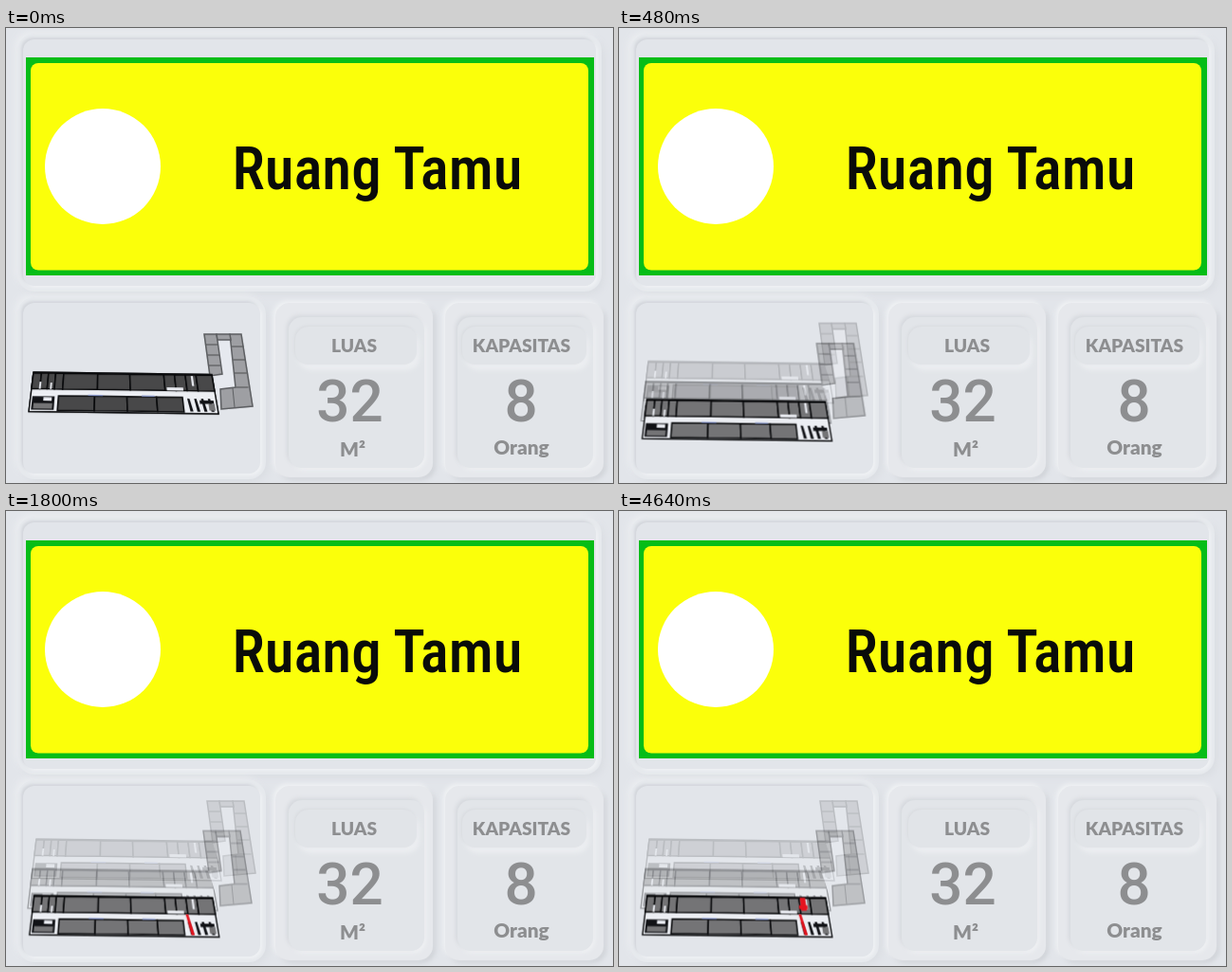
An HTML page that plays this animation: 640x480 px, repeating every 5.12 s.

```html
<!DOCTYPE html>
<html lang="id">
<head>
<meta charset="utf-8">
<title>Ruang Tamu</title>
<style>
html, body { margin: 0; width: 100%; height: 100%; overflow: hidden; background: #e2e5ea; }
.stage { position: relative; width: 640px; height: 480px; overflow: hidden; background: #e2e5ea; }
.stage div { position: absolute; box-sizing: border-box; }
.well {
  border-radius: 12px; background: #e2e5ea;
  box-shadow: -2px -2px 3px #d3d6dc, 2px 2px 3px #eff1f4, 0 0 0 6px #e6e9ed, 4px 4px 9px 4px #d9dce1, -4px -4px 9px 4px #eceef1;
}
.ring { border-radius: 15px; background: #e6e8ec; box-shadow: -2px -2px 5px #f1f3f5, 3px 3px 5px #d0d3d8; }
.dip { border-radius: 14px; background: #e2e5e9; box-shadow: -2px -2px 4px #d5d8dd, 2px 2px 4px #f0f2f4; }
.chip { border-radius: 14px; background: #e1e4e8; box-shadow: -1px -1px 3px #d8dbdf, 3px 6px 5px #eceef1; }
svg { position: absolute; left: 0; top: 0; }
text { text-anchor: middle; fill: #8d8e90; }
.title { font: 500 63px "Roboto Condensed", Roboto, sans-serif; font-stretch: condensed; fill: #090b09; }
.num { font: 500 62px Roboto, sans-serif; }
.label { font: 900 19.2px Lato, sans-serif; }
.unit { font: 900 20.8px Lato, sans-serif; }

.low, .mid, .top, .low .room { animation: 5120ms linear infinite; }
.low { animation-name: low; }
.mid { animation-name: mid; }
.top { animation-name: top; }
.low .room { animation-name: lighten; }
.path { fill: #e5141f; opacity: 0; animation: first 5120ms linear infinite; }
.path.second { animation-name: second; }
/* Floors part during the first 1120 ms, easing out */
@keyframes low {
  0% { transform: translate(0, 0); animation-timing-function: cubic-bezier(.5, 1, .89, 1); }
  21.875%, 100% { transform: translate(.7px, 42.5px); }
}
@keyframes mid {
  0% { transform: translate(0, 0); opacity: .46; animation-timing-function: cubic-bezier(.5, 1, .89, 1); }
  21.875%, 100% { transform: translate(-1px, 14.5px); opacity: .32; }
}
@keyframes top {
  0% { transform: translate(0, 0); opacity: .28; animation-timing-function: cubic-bezier(.5, 1, .89, 1); }
  21.875%, 100% { transform: translate(3px, -17px); opacity: .18; }
}
@keyframes lighten {
  0% { fill: #484849; }
  5%, 100% { fill: #747476; }
}
@keyframes first {
  0%, 23.4% { opacity: 0; }
  33.6%, 100% { opacity: 1; }
}
@keyframes second {
  0%, 35.2% { opacity: 0; }
  44.5%, 100% { opacity: 1; }
}
</style>
</head>
<body>
<div class="stage">
  <div class="well" style="left:18px;top:12px;width:604px;height:260px"></div>
  <div class="well" style="left:18px;top:290px;width:250px;height:180px"></div>
  <div class="ring" style="left:284px;top:290px;width:166px;height:184px"></div>
  <div class="dip" style="left:298px;top:305px;width:143px;height:159px"></div>
  <div class="chip" style="left:305px;top:315px;width:128px;height:40px"></div>
  <div class="ring" style="left:463px;top:290px;width:167px;height:184px"></div>
  <div class="dip" style="left:476px;top:305px;width:143px;height:159px"></div>
  <div class="chip" style="left:481px;top:315px;width:131px;height:40px"></div>
  <svg width="640" height="480" viewBox="0 0 640 480">
    <path fill="#06bd17" d="M21 31h599v230H21z"/>
    <rect x="26" y="37" width="588" height="218.5" rx="8" fill="#fbff0a"/>
    <circle cx="102" cy="146" r="61" fill="#fff"/>
    <text class="title" x="391.5" y="169.5">Ruang Tamu</text>
    <text class="label" x="367" y="341.5">LUAS</text>
    <text class="label" x="543.5" y="341.5">KAPASITAS</text>
    <text class="num" x="362.5" y="415">32</text>
    <text class="num" x="543" y="415">8</text>
    <text class="unit" x="365.5" y="452">M²</text>
    <text class="unit" x="543.5" y="449.5">Orang</text>
    <g id="plan"></g>
  </svg>
</div>
<script>
// Plan coordinates: u runs along the building, v from back to front.
const at = (u, v) => [29 - 5 * v + u * (188 + 12 * v), 363 + 2.5 * u + 41.5 * v];
const poly = (points, attrs) =>
  `<polygon points="${points.map(p => p.map(n => n.toFixed(1))).join(' ')}" ${attrs}/>`;
const quad = (u0, v0, u1, v1, attrs) =>
  poly([at(u0, v0), at(u1, v0), at(u1, v1), at(u0, v1)], attrs);
const ROOM = 'class="room" fill="#747476" stroke="#08090b" stroke-width="1.5"';
const DARK = 'fill="#111216"';
const PALE = 'fill="#e9ebf1"';

function row(walls, v0, v1) {
  return walls.slice(1).map((u, i) => quad(walls[i], v0, u, v1, ROOM)).join('');
}

function body() {
  let s = quad(0, 0, 1, 1, 'fill="#eceef3" stroke="#08090b" stroke-width="1.4"');
  s += row([0, .045, .085, .125, .17, .36, .54, .73, .79, .85, .91, 1], .02, .42);
  s += row([.15, .345, .52, .68, .82], .59, .96);
  // Openings, stairs and small rooms at both ends
  s += quad(.74, .34, .83, .42, PALE) + quad(.88, .04, .892, .3, PALE);
  s += quad(.04, .24, .05, .42, PALE) + quad(.1, .26, .11, .42, PALE);
  s += quad(.01, .61, .13, .95, DARK) + quad(.02, .78, .12, .92, 'fill="#747476"');
  s += quad(.07, .63, .115, .72, PALE);
  for (let i = 0; i < 4; i++) {
    const u = .845 + i * .037;
    s += poly([at(u, .62), at(u + .012, .62), at(u + .025, .95), at(u + .009, .95)], DARK);
  }
  s += quad(.91, .66, .985, .75, DARK) + quad(.955, .75, .988, .92, 'fill="#747476"');
  s += quad(.31, .555, .39, .585, 'fill="#8190c4"') + quad(.6, .555, .67, .585, 'fill="#8190c4"');
  return s;
}

function wing() {
  const line = (x, y, w) =>
    `<path d="M${x} ${y}h${w}" stroke="#08090b" stroke-width="1.3"/>`;
  let s = poly([[209, 323], [248, 323], [260, 399], [226, 402], [215, 367]], PALE);
  s += poly([[209, 323], [222, 323], [228, 365], [215, 367]], ROOM);
  s += poly([[236, 323], [248, 323], [260, 399], [227, 402], [226, 381], [242, 379]], ROOM);
  s += poly([[222, 323], [236, 323], [237, 329], [223, 329]], ROOM);
  for (const d of [11, 22, 33]) s += line(209 + d / 7, 323 + d, 13);
  for (const d of [13, 27, 41, 56]) s += line(236 + d / 8.5, 323 + d, 13);
  return s + '<path d="M239 380l2 20" stroke="#08090b"/>';
}

const route =
  poly([at(.838, .43), at(.852, .43), at(.873, .96), at(.856, .96)], 'class="path"') +
  quad(.855, .01, .885, .34, 'class="path second"') +
  quad(.845, .2, .892, .3, 'class="path second"');

document.getElementById('plan').innerHTML =
  `<g class="top">${body()}${wing()}</g>` +
  `<g class="mid">${body()}${wing()}</g>` +
  `<g class="low">${body()}${route}</g>`;
</script>
</body>
</html>
```
